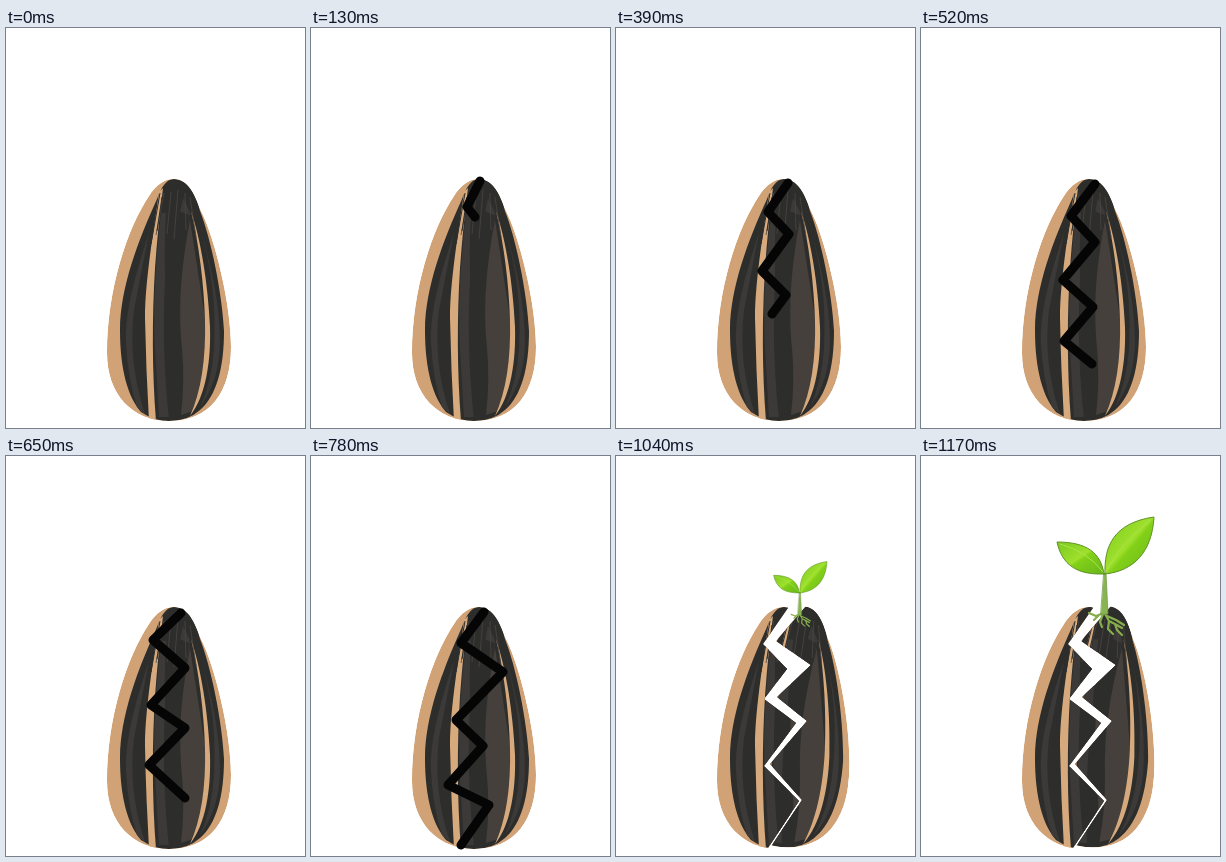
These frames come from a looping animation (299 by 400 pixels, 1300 ms). An HTML page:

```html
<!DOCTYPE html>
<html lang="en">
<head>
<meta charset="utf-8">
<title>Sprouting seed</title>
<style>
  html, body { margin: 0; width: 100%; height: 100%; overflow: hidden; background: #fff; }
  svg { display: block; width: 100vw; height: 100vh; }
</style>
</head>
<body>
<svg viewBox="0 0 299 400">
  <defs>
    <linearGradient id="leaf" x1="0" y1="0" x2="1" y2="1">
      <stop offset="0" stop-color="#79c91f"/>
      <stop offset=".48" stop-color="#9fe02c"/>
      <stop offset=".54" stop-color="#83d019"/>
      <stop offset="1" stop-color="#67b51c"/>
    </linearGradient>
    <clipPath id="outline">
      <path id="hull" d="M168 151C158 151 150 157 143 168C121 201 101 262 101 325C101 366 126 393 163 393C204 393 225 364 225 319C225 276 209 211 195 183C189 168 183 151 168 151Z"/>
    </clipPath>
    <clipPath id="leftSide">
      <path d="M0 0H172V152L147 188L171 213L148 243L180 267L148 310L183 345L152 392V400H0Z"/>
    </clipPath>
    <clipPath id="rightSide">
      <path d="M299 0H190V150L160 185L195 209L161 241L191 265L154 308L186 344L154 392V400H299Z"/>
    </clipPath>

    <g id="seed" clip-path="url(#outline)">
      <use href="#hull" fill="#d1a276"/>
      <path fill="#2d2d2c" d="M168 151C160 151 155 160 151 171C132 213 114 260 114 302C114 342 122 369 135 384Q148 393 163 393Q182 393 194 382C210 368 218 341 218 303C216 264 205 211 194 183C190 165 181 151 168 151Z"/>
      <path fill="#3b3a38" d="M143 205C128 250 119 285 120 315Q122 352 131 379L139 386C127 350 124 315 128 282Z"/>
      <path fill="#3b3a38" d="M155 185C149 240 147 282 149 320L153 389H172C178 350 171 308 174 270Q178 222 184 184L177 170C169 206 164 250 163 289C158 258 158 221 160 185Z"/>
      <path fill="#2d2d2c" d="M166 180C158 240 154 305 163 391H174C181 350 170 305 175 263L183 187Z"/>
      <path fill="#45403c" d="M184 192C175 240 172 278 176 320Q179 353 175 387L187 383C199 357 201 320 199 290Z"/>
      <path fill="#3b3a38" d="M195 203C207 248 210 280 208 320Q206 353 194 379Q213 354 214 315C214 280 207 244 195 203Z"/>
      <path fill="#d7aa7d" d="M153 164C149 195 139 251 139 290Q140 342 143 393H150C146 342 146 290 149 240Q152 198 157 160Z"/>
      <path fill="#d7aa7d" d="M185 183C193 216 198 257 199 292C200 331 195 364 184 388C200 368 205 333 204 299C202 255 195 213 185 183Z"/>
      <path fill="none" stroke="#4c4641" stroke-width=".8" d="M158 165L150 207M165 164L161 206M172 162L168 211M179 165L180 202M184 169L190 209"/>
      <path fill="none" stroke="#2d2d2c" d="M154 165L145 216M156 169L151 203"/>
    </g>
  </defs>

  <g id="whole">
    <use href="#seed"/>
    <polyline id="crack" fill="none" stroke="#050505" stroke-width="9" stroke-linecap="round" stroke-linejoin="round"/>
  </g>
  <g id="split">
    <g clip-path="url(#leftSide)"><use href="#seed"/></g>
    <g clip-path="url(#rightSide)"><use href="#seed" transform="translate(3 -2) rotate(4 160 392)"/></g>
  </g>
  <g id="sprout" stroke-linejoin="round" stroke-linecap="round">
    <path fill="none" stroke="#86ad4c" stroke-width="2.2" d="M183 157L175 160L168 157M178 159L173 164M182 158L179 166L181 171M184 158L188 165L187 173L192 178M188 165L194 168L196 174L201 179M186 160L195 164L203 169M194 168L201 172"/>
    <path fill="#88b552" stroke="#6b913d" stroke-width=".7" d="M183 117H185L187 158H180Z"/>
    <g fill="url(#leaf)" stroke="#609226" stroke-width="1">
      <path d="M184 118C183 91 192 67 233 61C231 96 213 115 184 118Z"/>
      <path d="M183 118C180 97 166 86 136 86C141 109 156 119 183 118Z"/>
    </g>
    <path fill="none" stroke="#a9e54c" stroke-width="1" d="M185 116Q198 88 230 64M182 116Q166 95 139 88"/>
  </g>
</svg>
<script>
const STEP = 130, STEPS = 10, SPLIT = 7;
const cracks = [
  "",
  "169,153 156,179 164,189",
  "170,153 155,181 171,197 149,232 167,254",
  "172,155 152,184 173,206 146,243 170,267 156,286",
  "174,156 150,188 174,214 142,252 172,279 143,313 171,336",
  "175,157 147,184 179,212 145,249 179,272 143,309 179,342",
  "173,156 150,187 192,216 145,264 172,290 137,329 178,349 150,389"
];
const el = id => document.getElementById(id);
const show = (id, on) => el(id).style.display = on ? "" : "none";

function draw(now) {
  const step = Math.floor(now / STEP) % STEPS;
  show("whole", step < SPLIT);
  show("split", step >= SPLIT);
  show("sprout", step > SPLIT);
  el("crack").setAttribute("points", cracks[step] || "");
  // The sprout grows from its roots.
  const size = step === STEPS - 1 ? 1 : 0.55;
  el("sprout").setAttribute("transform", `translate(184 160) scale(${size}) translate(-184 -160)`);
  requestAnimationFrame(() => draw(performance.now() - start));
}
const start = performance.now();
draw(0);
</script>
</body>
</html>
```
